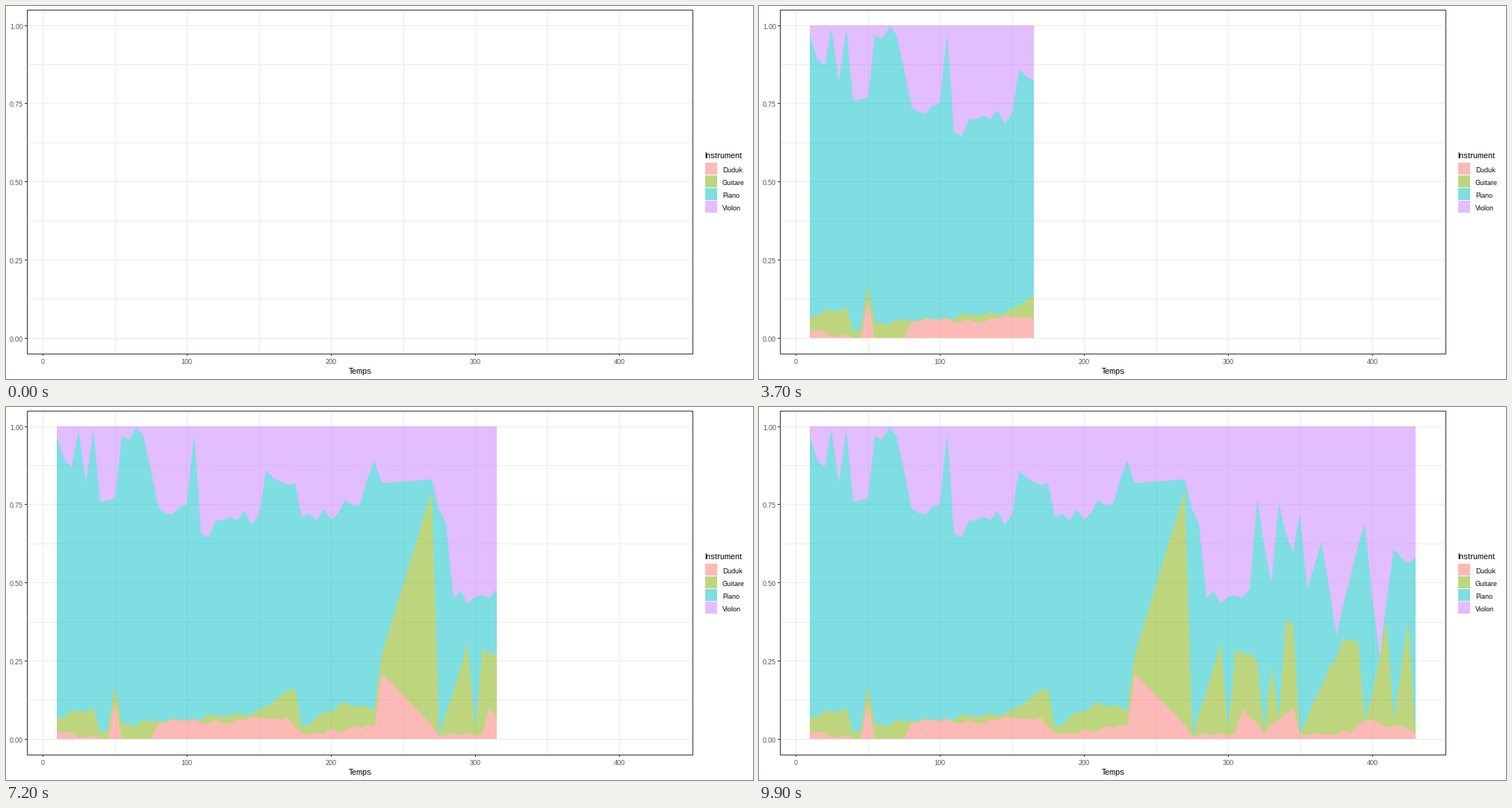
Write a matplotlib script that moves like this. It is 1000 by 500 pixels and loops after 10 s.

```python
import numpy as np
import matplotlib.pyplot as plt
from matplotlib.animation import FuncAnimation
from matplotlib.patches import Polygon, Rectangle

plt.rcParams.update({"font.family": "Liberation Sans",
                     "text.hinting": "native", "text.hinting_factor": 1})

W, H, DPI = 1000, 500, 100
FRAMES, STEP = 100, 100
PX = 72 / DPI
LEFT, RIGHT, TOP, BOTTOM = 28, 919, 5, 466
GREY, DARK = "#4D4D4D", "#333333"
LAYERS = {"Duduk": "#F8766D", "Guitare": "#7CAE00",
          "Piano": "#00BFC4", "Violon": "#C77CFF"}

# Measurements every 5 units, with a gap between 235 and 270
times = np.r_[10:236:5, 270:431:5]
rng = np.random.default_rng(7)


def series(keys, wobble):
    """Straight runs between key points, with a small wobble on other steps."""
    noise = rng.uniform(-wobble, wobble, len(times))
    noise[np.isin(times, list(keys))] = 0
    return np.interp(times, list(keys), list(keys.values())) + noise


duduk = series({10: 2, 45: 0, 50: 12, 55: 0, 75: 0, 80: 5, 170: 7, 180: 2,
                230: 4, 235: 21, 270: 4.5, 275: 1, 305: 2, 310: 10, 325: 2,
                345: 10, 350: 2, 385: 2, 395: 6, 430: 2}, 1)
guitare = series({10: 7, 35: 10, 40: 2, 45: 3, 50: 17, 55: 5, 145: 8, 175: 16,
                  180: 4, 210: 12, 230: 9, 235: 27, 270: 79.5, 275: 1,
                  295: 31, 300: 3, 305: 29, 320: 25, 325: 2, 330: 24, 335: 1,
                  340: 38, 345: 37, 350: 2, 380: 32, 390: 31, 395: 2,
                  410: 38, 415: 6, 425: 38, 430: 3}, 1)
piano = series({10: 97, 20: 87, 25: 99, 30: 82, 35: 99, 40: 76, 50: 77,
                55: 97, 70: 97, 80: 74, 100: 75, 105: 98, 110: 66, 150: 72,
                155: 86, 175: 82, 180: 71, 220: 75, 230: 89, 235: 82, 270: 83,
                280: 69, 285: 45, 315: 48, 320: 77, 330: 50, 335: 76, 345: 60,
                350: 72, 355: 48, 365: 63, 375: 33, 395: 69, 405: 23, 415: 61,
                430: 58}, 3)

duduk = np.clip(duduk, 0, 100)
guitare = np.maximum(guitare, duduk)
piano = np.clip(piano, guitare, 100)
tops = [duduk, guitare, piano, np.full(len(times), 100)]

# Each measurement is reached on a whole frame; gaps are filled linearly
arrival = np.round((times - 10) * (FRAMES - 1) / 420)


def px(t):
    return np.round(49.15 + 1.9295 * t)


def py(percent):
    return np.round(445.3 - 4.191 * percent)


fig = plt.figure(figsize=(W / DPI, H / DPI), dpi=DPI, facecolor="white")
ax = fig.add_axes([0, 0, 1, 1])


def line(xs, ys):
    ax.plot(xs, ys, color=DARK, lw=PX, zorder=4, snap=False,
            solid_capstyle="butt")


def label(x, y, text, size, color="black", ha="left"):
    ax.text(x, y, text, fontsize=size * PX, color=color, ha=ha,
            va="baseline", zorder=5)


cols = np.floor(49.9 + 96.43 * np.arange(9)).astype(int)
rows = np.floor(445.3 - 52.39 * np.arange(9)).astype(int)
paper = np.ones((H, W))
paper[rows, LEFT:RIGHT] = 235 / 255
paper[TOP:BOTTOM, cols] = 235 / 255

# Solid layers lie between the paper and a half-clear copy of it,
# which gives even half-transparent colours with the grid showing through
for alpha, z in ((1, 1), (0.5, 3)):
    ax.imshow(paper, cmap="gray", vmin=0, vmax=1, alpha=alpha, zorder=z,
              extent=(0, W, H, 0), interpolation="nearest", aspect="auto")
ax.set_xlim(0, W)
ax.set_ylim(H, 0)
ax.axis("off")

for i in range(0, 9, 2):
    x, y = cols[i] + 0.5, rows[i] + 0.5
    line([x, x], [BOTTOM + 1, BOTTOM + 3])
    line([LEFT - 3, LEFT], [y, y])
    label(x - 0.5, 480, str(50 * i), 9, GREY, "center")
    label(23, y + 4.5, f"{i / 8:.2f}", 9, GREY, "right")

ax.add_patch(Rectangle((LEFT + 0.5, TOP + 0.5), RIGHT - LEFT, BOTTOM - TOP,
                       fill=False, ec=DARK, lw=PX, zorder=4, snap=False))
label(474, 493, "Temps", 11, ha="center")
label(935.5, 204, "Instrument", 11)

areas = []
for i, (name, color) in enumerate(LAYERS.items()):
    y = 210 + 17 * i
    ax.add_patch(Rectangle((936, y), 16, 16, fc=color, lw=0, zorder=2,
                           snap=False))
    label(959, y + 13, name, 9)
    areas.append(ax.add_patch(Polygon(np.zeros((3, 2)), fc=color, lw=0,
                                      zorder=2.9 - 0.1 * (4 - i) + 0.1 * 0,
                                      snap=False)))
    areas[-1].set_zorder(2.5 - 0.1 * i)


def draw(k):
    now = np.interp(k, arrival, times)
    ts = np.append(times[times < now], now)
    xs = px(ts)
    for area, top in zip(areas, tops):
        ys = py(np.interp(ts, times, top))
        area.set_visible(k > 0)
        area.set_xy(np.column_stack([np.r_[xs[0], xs, xs[-1]],
                                     np.r_[py(0), ys, py(0)]]))
    return areas


anim = FuncAnimation(fig, draw, frames=FRAMES, interval=STEP,
                     init_func=lambda: draw(0), repeat=True, repeat_delay=0)
plt.show()
```
